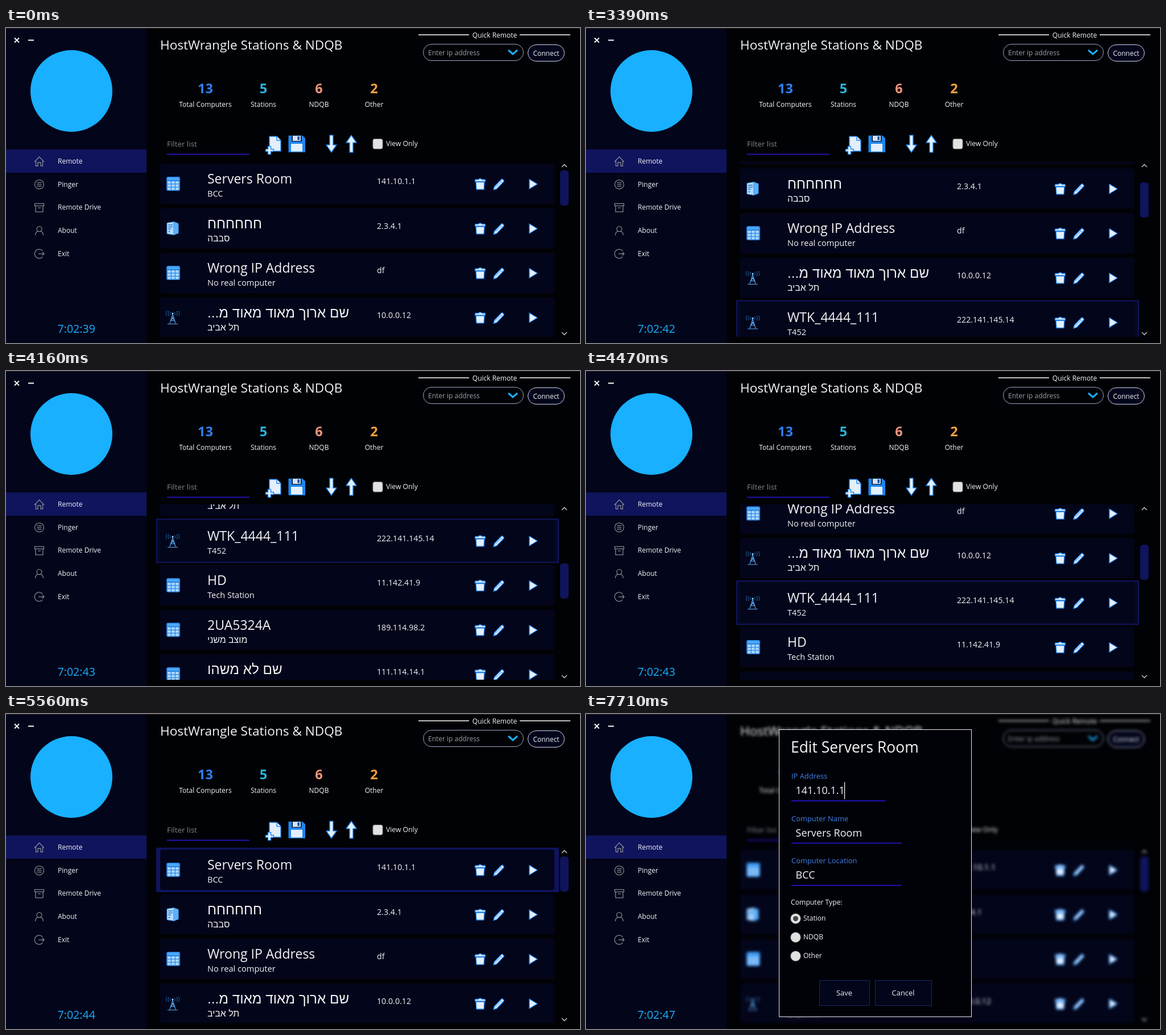
Write an HTML page that moves like this. It is 1009 by 555 pixels and loops after 8 s.

```html
<!DOCTYPE html>
<html lang="en">
<head>
<meta charset="utf-8">
<title>Remote stations</title>
<style>
  html, body { margin: 0; width: 100%; height: 100%; overflow: hidden; background: #010205; }
  svg { display: block; }
  text { font-family: "Open Sans", "Noto Sans", sans-serif; fill: #f4f5fa; white-space: pre; }
  .he { font-family: "Liberation Sans", "DejaVu Sans", sans-serif; }
  .mid { text-anchor: middle; }
  .blurred { filter: blur(2.4px); }
  .line { fill: none; stroke: #85878f; stroke-width: 1.3; }
</style>
</head>
<body>
<svg id="stage" width="1009" height="555" viewBox="0 0 1009 555"></svg>
<script>
const LOOP = 8000, PITCH = 78.5, LIST_TOP = 235;
const NAVY = '#03051a', ACTIVE = '#0f145c', SKY = '#18b0ff', UNDERLINE = '#1e12b4';

const ROWS = [
  ['table', 'Servers Room', 'BCC', '141.10.1.1'],
  ['server', 'חחחחחח', 'סבבה', '2.3.4.1'],
  ['table', 'Wrong IP Address', 'No real computer', 'df'],
  ['antenna', 'שם ארוך מאוד מאוד מ...\u200f', 'תל אביב', '10.0.0.12'],
  ['antenna', 'WTK_4444_111', 'T452', '222.141.145.14'],
  ['table', 'HD', 'Tech Station', '11.142.41.9'],
  ['table', '2UA5324A', 'מוצב משני', '189.114.98.2'],
  ['table', 'שם לא משהו', '', '111.114.14.1'],
];

// row index, from ms, to ms
const HOVERS = [[3, 1300, 1370], [0, 2620, 2840], [0, 5240, 6870]];
const SELECTED = { row: 4, from: 3390, to: 5240 };
// time ms, list offset px
const SCROLL = [[3390, 69.6], [4160, 289.6], [4240, 289.6], [4700, 72.6], [4860, 0]];
const DIALOG_AT = 6870, CARET_OFF = [7100, 7630];

const isHebrew = s => /[\u0590-\u05ff]/.test(s);

function text(x, y, size, str, attrs = '') {
  const he = isHebrew(str);
  return `<text x="${x}" y="${y}" font-size="${he ? size + 1.3 : size}" ${he ? 'class="he"' : ''} ${attrs}>${str.replace('&', '&amp;')}</text>`;
}
const mid = (x, y, size, str, attrs = '') => text(x, y, size, str, `class="mid" ${attrs}`);
const box = (x, y, w, h, fill, attrs = '') => `<rect x="${x}" y="${y}" width="${w}" height="${h}" fill="${fill}" ${attrs}/>`;
const path = (d, attrs) => `<path d="${d}" ${attrs}/>`;
const group = (x, y, body) => `<g transform="translate(${x} ${y})">${body}</g>`;

const PALE = 'fill="#e4effc" stroke="#1f86f0" stroke-width="1.4" stroke-linejoin="round"';

function tableIcon() {
  let cells = '';
  for (let i = 0; i < 9; i++)
    cells += box(2 + i % 3 * 7, 8 + Math.floor(i / 3) * 5.5, 5.8, 4.3, '#a9d6ff');
  return box(0, 0, 24, 25, '#2585e6', 'rx="3"') + box(1.5, 1.5, 21, 4.5, '#4ea8fb', 'rx="2"') + cells;
}

const ICONS = {
  table: tableIcon(),
  server:
    path('M1 3 L13 1 V24 L1 22Z', 'fill="#b5dcff" stroke="#3d9bf5"') +
    path('M13 1 L21 4 V21 L13 24Z', 'fill="#5db0fa" stroke="#3d9bf5"') +
    path('M3 6.5H11M3 10H11M3 13.5H8', 'stroke="#2375c8" stroke-width="1.4"') +
    '<circle cx="5" cy="18" r="1.3" fill="#2375c8"/>',
  antenna:
    path('M11 7 L6 23 M11 7 L16 23 M9.500 12.500H12.500L7.500 18H14.500L9.500 12.500 M2 24H20',
      'fill="none" stroke="#58acf5" stroke-width="1.1"') +
    '<circle cx="11" cy="5.500" r="1.500" fill="#a9d6ff"/>' +
    path('M7.500 3Q6 5.500 7.500 8 M14.500 3Q16 5.500 14.500 8 M4 1.500Q2 5.500 4 9.500 M18 1.500Q20 5.500 18 9.500 M.500 1Q-1.500 5.500 .500 10 M21.500 1Q23.500 5.500 21.500 10',
      'fill="none" stroke="#3c9cf0" stroke-width="1" stroke-dasharray="2 1"'),
  trash:
    path('M.500 3.500Q.500 2 2 2H6.500Q7 .500 9.500 .500T12.500 2H17Q18.500 2 18.500 3.500V5.500H.500Z', PALE) +
    path('M2 6.500H17L16 19.500H3Z', PALE),
  pencil:
    path('M1 20 L2.500 14.500 L14.500 2 Q16 .5 18 2.500 Q20 4.500 18.500 6 L6.500 18.500Z', PALE) +
    path('M13 4L17 8M4 16L14 6', 'stroke="#1f86f0" stroke-width="1"'),
  play: path('M1 1 L15 9.500 L1 18Z', PALE),
};

const rowMarkup = ([icon, name, place, ip], i) => group(0, i * PITCH,
  box(265, 236.5, 706, PITCH - 2, 'none', `id="mark${i}" stroke-width="2"`) +
  box(271, 239, 693, 71, NAVY, 'rx="4"') +
  group(282, 262, ICONS[icon]) +
  text(354, 274, 23, name) + text(354, 297, 14.6, place) + text(652, 275, 14.2, ip) +
  group(824, 265, ICONS.trash) + group(856, 265, ICONS.pencil) + group(919, 265.5, ICONS.play));

function header() {
  const stats = [
    [350.5, '13', 'Total Computers', '#2f80f5'], [452.5, '5', 'Stations', '#27b4dd'],
    [550, '6', 'NDQB', '#ef957a'], [647, '2', 'Other', '#f9a03a'],
  ];
  return text(271, 38, 22.6, 'HostWrangle Stations & NDQB') +
    path('M725 12H814M903 12H992', 'stroke="#fff" stroke-width="1.3"') +
    mid(859, 17, 12, 'Quick Remote') +
    box(733.5, 28.5, 176, 29, '#010205', 'rx="14.5" stroke="#98a6c8"') +
    text(742, 47.5, 12, 'Enter ip address', 'style="fill:#9a9ea9"') +
    path('M883 39L891 46L899 39', `fill="none" stroke="${SKY}" stroke-width="3"`) +
    box(917.5, 29.5, 64, 29, NAVY, 'rx="14.5" stroke="#cdd6fa"') +
    mid(949.5, 48.5, 12, 'Connect') +
    stats.map(([x, n, label, color]) =>
      mid(x, 115, 23.5, n, `font-weight="700" style="fill:${color}"`) + mid(x, 138.5, 12, label)).join('');
}

function toolbar() {
  const arrow = 'M7 1H13V18H19L10 31L1 18H7Z';
  return text(283, 209, 13.4, 'Filter list', 'style="fill:#85878f"') +
    box(283, 221.500, 145, 2, UNDERLINE) +
    path('M463 191H476L483 198V217H463Z', PALE) + path('M476 191V198H483', PALE) +
    path('M460.500 208.500H465.500V213.500H470.500V217.500H465.500V222.500H460.500V217.500H456.500V213.500H460.500Z', PALE) +
    path('M497 190H521L525.500 194V218.500H497Z', 'fill="#1f86f0" stroke="#1f86f0" stroke-linejoin="round"') +
    box(502.500, 190, 17, 10, NAVY) + box(504, 190, 14, 9, '#cfe5fc') + box(512.500, 191, 3.500, 6.500, '#0b4fa8') +
    box(501, 204, 20, 13.500, '#e4effc') +
    group(562, 188, path(arrow, PALE)) +
    `<g transform="translate(597 220) scale(1 -1)">${path(arrow, PALE)}</g>` +
    box(645, 195.500, 17, 17.500, '#e2e2e2', 'rx="3" stroke="#8e8e8e"') +
    text(668, 208, 12.2, 'View Only');
}

function sidebar() {
  const items = ['Remote', 'Pinger', 'Remote Drive', 'About', 'Exit'];
  const icons = [
    'M50 236L58.500 227L67 236M52.500 234V243H56V237H61V243H64.500V234',
    'M66.500 235A8 8 0 1 1 50.500 235A8 8 0 1 1 66.500 235M54.500 232H62.500M54.500 235H62.500M54.500 238H62.500',
    'M50.500 228H66.500V232H50.500ZM52 232V242.500H65V232M56 235.500H61',
    'M63 232A4.500 4.500 0 1 1 54 232A4.500 4.500 0 1 1 63 232M51.500 243Q52 237 56 236M65.500 243Q65 237 61 236',
    'M64.500 230A8 8 0 1 0 64.500 240M57 235H67M64 232L67 235L64 238',
  ];
  return box(0, 0, 247, 555, NAVY) +
    path('M15 17.500L23 25.500M23 17.500L15 25.500M39 21.500H49', 'stroke="#fff" stroke-width="1.8"') +
    `<circle cx="115" cy="111" r="72" fill="${SKY}"/>` +
    box(0, 214, 247, 41, ACTIVE) +
    items.map((s, i) => group(0, i * 40.7, path(icons[i], 'class="line"') + text(91, 239, 12, s))).join('') +
    text(90.5, 537, 19.6, '', `id="clock" style="fill:${SKY}"`);
}

function dialog() {
  const field = (y, label, value, width) =>
    text(361, y, 12.9, label, 'style="fill:#4380e6"') + text(368.5, y + 27, 18, value) +
    box(361, y + 38, width, 2, UNDERLINE);
  const radio = (y, label, on) =>
    `<circle cx="368.5" cy="${y}" r="8.700" fill="#e0e1e2" stroke="#a5a5a5" stroke-width=".8"/>` +
    (on ? `<circle cx="368.5" cy="${y}" r="4.500" fill="#454549"/>` : '') + text(382, y + 3.500, 12, label);
  const button = (x, w, label) =>
    box(x + .5, 469.500, w, 44, NAVY, 'stroke="#152b60"') + mid(x + w / 2, 496, 12.9, label);
  return box(339.5, 27.5, 338, 506, '#010208', 'stroke="#e9e9ec"') +
    text(360, 68, 26.4, 'Edit Servers Room') +
    field(114, 'IP Address', '141.10.1.1', 165) +
    field(188.5, 'Computer Name', 'Servers Room', 194) +
    field(263, 'Computer Location', 'BCC', 194) +
    box(454, 120, 1.2, 30, '#fff', 'id="caret"') +
    text(360, 336, 12.2, 'Computer Type:') +
    radio(360.5, 'Station', true) + radio(393.5, 'NDQB') + radio(426.5, 'Other') +
    button(410, 88, 'Save') + button(508, 99, 'Cancel');
}

document.getElementById('stage').innerHTML =
  `<clipPath id="view">${box(264, LIST_TOP, 708, 309, '#000')}</clipPath>` +
  box(0, 0, 1009, 555, '#010205') +
  `<g id="main">${header()}${toolbar()}
    <g clip-path="url(#view)"><g id="list">${ROWS.map(rowMarkup).join('')}</g></g>
    ${path('M977 245L981.500 240.500L986 245M977 536L981.500 540.500L986 536', 'fill="none" stroke="#b4b5ba" stroke-width="1.6"')}
    ${box(974, 251, 15, 62, ACTIVE, 'rx="5" id="thumb"')}</g>` +
  sidebar() + `<g id="dialog">${dialog()}</g>` + box(0, 0, 1009, 1, '#2a211e');

const el = id => document.getElementById(id);
const [main, list, thumb, clock, popup, caret] = ['main', 'list', 'thumb', 'clock', 'dialog', 'caret'].map(el);
const marks = ROWS.map((_, i) => el('mark' + i));
const during = (t, from, to) => t >= from && t < to;
const show = (node, on) => node.setAttribute('visibility', on ? 'visible' : 'hidden');

function scrollAt(t) {
  if (t < SCROLL[0][0]) return 0;
  const next = SCROLL.findIndex(([time]) => time > t);
  if (next < 0) return 0;
  const [t0, y0] = SCROLL[next - 1], [t1, y1] = SCROLL[next];
  return y0 + (y1 - y0) * (t - t0) / (t1 - t0);
}

function draw(t) {
  const offset = scrollAt(t);
  list.setAttribute('transform', `translate(0 ${-Math.round(offset * 2) / 2})`);
  thumb.setAttribute('y', Math.round(251 + offset * .304));
  clock.textContent = '7:02:' + (39 + Math.floor((t + 335) / 1003));

  marks.forEach((mark, i) => {
    const hover = HOVERS.some(([row, from, to]) => row === i && during(t, from, to));
    const selected = i === SELECTED.row && during(t, SELECTED.from, SELECTED.to);
    mark.setAttribute('fill', hover ? ACTIVE : selected ? '#060826' : 'none');
    mark.setAttribute('stroke', hover || selected ? ACTIVE : 'none');
  });

  const open = t >= DIALOG_AT;
  main.setAttribute('class', open ? 'blurred' : '');
  show(popup, open);
  show(caret, open && !during(t, ...CARET_OFF));
}

const start = performance.now();
function tick() {
  draw((performance.now() - start) % LOOP);
  requestAnimationFrame(tick);
}
draw(0);
requestAnimationFrame(tick);
</script>
</body>
</html>
```
